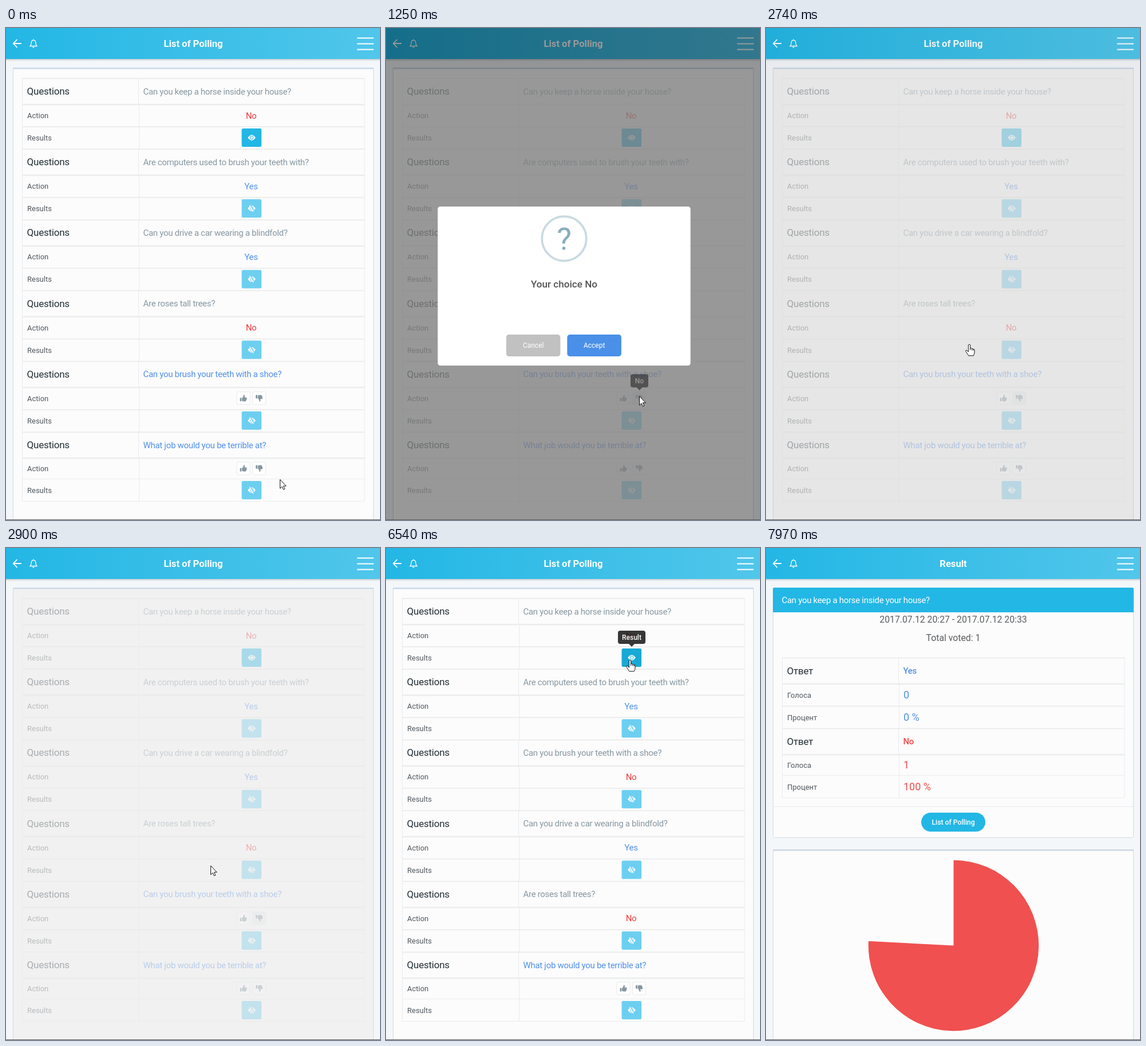
An HTML page for the animation above (8 s loop, 653 px wide and 857 px high).

```html
<!DOCTYPE html>
<html lang="en">
<head>
<meta charset="utf-8">
<title>List of Polling</title>
<style>
html, body { margin: 0; width: 100%; height: 100%; overflow: hidden; background: #f4f7fa; }
svg { display: block; width: 653px; height: 857px; }
text { font-family: Roboto, "Open Sans", sans-serif; font-weight: 400; }
.label { font-size: 17px; letter-spacing: -.22px; fill: #232f36; }
.body { font-size: 15px; letter-spacing: -.3px; }
.small { font-size: 13px; fill: #51585e; }
.value { font-size: 18px; }
.title { font-size: 16.6px; font-weight: 700; fill: #fff; }
.info { font-size: 15.8px; fill: #5a5d60; }
.tip { font-size: 12px; fill: #fff; }
.mid { text-anchor: middle; }
.strong { font-weight: 500; }
</style>
</head>
<body>
<svg id="stage" viewBox="0 0 653 857" xmlns="http://www.w3.org/2000/svg"></svg>
<script>
const W = 653, H = 857, LOOP = 8000;
const CYAN = '#23b7e5', PALE = '#6dcff0', BLUE = '#5290ea', RED = '#ee3b3b', GREY = '#8797a1';

// ---- markup helpers ----
const rect = (x, y, w, h, fill, extra = '') =>
  `<rect x="${x}" y="${y}" width="${w}" height="${h}" fill="${fill}" ${extra}/>`;
const text = (x, y, str, cls, extra = '') =>
  `<text x="${x}" y="${y}" class="${cls}" ${extra}>${str}</text>`;
const group = (id, body, extra = '') => `<g id="${id}" ${extra}>${body}</g>`;
const fill = c => `fill="${c}"`;

function eye(y, open) {
  const c = open ? CYAN : PALE;
  const slash = open ? '' :
    `<path d="M-2.6-6L4.4 5.4" stroke="${c}" stroke-width="1.6"/><path d="M-3.8-5.6L3.2 5.8" stroke="#fff" stroke-width="1.3"/>`;
  return rect(411.5, y - 16, 34.5, 32, c, 'rx="2.5"' + (open ? ' class="open"' : '')) +
    `<g transform="translate(429 ${y})" fill="none"><path d="M-6.8 0Q0-9.4 6.8 0Q0 9.4-6.8 0Z" fill="#fff"/>
     <circle r="2.9" stroke="${c}" stroke-width="1"/>${slash}</g>`;
}

function thumb(x, y, flip, id) {
  return rect(x - 11.5, y - 11, 23, 22, '#fff', `id="${id}" rx="2" stroke="#e6eaed"`) +
    `<path transform="translate(${x} ${y}) scale(1 ${flip})" fill="${GREY}"
      d="M-6-.5h2.8v6H-6ZM-2.4-.5C-.8-1.4.2-3 .4-5.8C2.4-6.2 3-4 2-1.4H5.4Q6.6-1 5.8.6Q6.2 1.6 5.4 2.4Q5.6 3.6 4.6 4.2Q4.6 5.6 3 5.6H.6L-2.4 4.8Z"/>`;
}

// Row group: a heading row and two detail rows; the last one is a little shorter.
function rows(y, last, labels, cells) {
  const [a, b, end] = last ? [64, 102, 121] : [65, 104, 123.2];
  const line = (dy, h, c = '#ececee') => rect(28, y + dy, 598.5, h, c);
  return line(0, 1.8) + line(45, 2.6, '#eceded') + line(end - 39, last ? 1 : 1.8) +
    (last ? line(end, 1) : '') +
    rect(28, y, 1, end, '#e9ebed') + rect(625.5, y, 1, end, '#e9ebed') +
    rect(231, y, 1, 45, '#e9ebed') + rect(232, y + 46, 1, end - 46, '#e9ebed') +
    text(36.5, y + 29, labels[0], 'label') +
    text(37, y + a + 5, labels[1], 'small') +
    text(37, y + b + 5, labels[2], 'small') + cells(y, y + a, y + b);
}

const card = (y, h) =>
  rect(12.5, y + .5, 629, h, '#fcfcfc', 'rx="3" stroke="#cfdbe4"') +
  rect(12, y, 630, 2.6, '#cbd8e5', 'rx="1.3"');

function poll(id, items) {
  return group(id, items.map(([q, answer], i) =>
    rows(87 + i * 123.2, i === 5, ['Questions', 'Action', 'Results'], (y, act, res) =>
      text(239.5, y + 28.5, q, 'body', fill(answer ? GREY : BLUE)) +
      (answer
        ? text(428, act + 5.5, answer, 'body mid', fill(answer === 'No' ? RED : BLUE))
        : thumb(414.5, act, 1, `${id}-up${i}`) + thumb(442, act, -1, `${id}-down${i}`)) +
      eye(res, i === 0))).join(''));
}

function tooltip(id, x, y, w, str) {
  return group(id, rect(x - w / 2, y, w, 23, '#222', 'rx="4"') +
    `<path d="M${x - 5} ${y + 23}h10l-5 5Z" fill="#222"/>` + text(x, y + 16, str, 'tip mid strong'), 'opacity="0"');
}

function answers(y, last, name, votes, pct, color) {
  return rows(y, last, ['Ответ', 'Голоса', 'Процент'], (top, a, b) =>
    text(239.5, top + 28.5, name, 'body strong', fill(color)) +
    text(240, a + 6.5, votes, 'value', fill(color)) +
    text(240, b + 6.5, pct, 'value', fill(color)));
}

// ---- scene ----
const horse = 'Can you keep a horse inside your house?';
const teeth = ['Are computers used to brush your teeth with?', 'Yes'];
const car = ['Can you drive a car wearing a blindfold?', 'Yes'];
const roses = ['Are roses tall trees?', 'No'];
const shoe = 'Can you brush your teeth with a shoe?';
const job = ['What job would you be terrible at?'];

const header = rect(0, 0, W, 54, 'url(#sky)') + rect(0, 54, W, 4, 'url(#shade)') +
  `<g fill="none" stroke="#fff" stroke-width="1.8">
   <path d="M27 27H13M19.5 20L12.8 27L19.5 34"/>
   <path d="M613 17.5H642M613 27.5H642M613 37.5H642"/>
   <path d="M42 31.5Q44.2 29 44.2 25.5Q44.2 21.3 48 21.3T51.8 25.5Q51.8 29 54 31.5Z" stroke-width="1.3"/>
   <path d="M46.5 33.2Q48 35 49.5 33.2M48 19.5V21.3" stroke-width="1.3"/></g>` +
  text(327, 33.3, 'List of Polling', 'title mid', 'id="title"');

const result = card(69, 435) + rect(12, 69, 630, 43, CYAN, 'rx="3"') + rect(12, 104, 630, 8, CYAN) +
  text(27.5, 95.5, horse, 'body', fill('#fff')) +
  text(327, 129.5, '2017.07.12 20:27 - 2017.07.12 20:33', 'info mid') +
  text(327, 161.5, 'Total voted: 1', 'info mid') +
  answers(190.5, false, 'Yes', '0', '0 %', BLUE) +
  answers(313.7, true, 'No', '1', '100 %', '#f04a4a') +
  rect(13, 450, 628, 1, '#e6eaed') + rect(271, 461, 112, 33, CYAN, 'rx="16.5"') +
  text(327, 481.5, 'List of Polling', 'mid strong', 'fill="#fff" font-size="12.2"') +
  card(525, 340) + '<path id="pie" fill="#f05050"/>';

const button = (x, color, str, id) => rect(x, 91.6, 102.4, 41, color, `rx="5" id="${id}"`) +
  text(x + 51.2, 116.8, str, 'mid', 'fill="#fff" font-size="13"');

const modal = rect(-239, -150, 478, 300, '#fff', 'rx="5"') +
  '<circle cy="-89.5" r="42" fill="none" stroke="#c9dae1" stroke-width="4"/>' +
  text(0, -69, '?', 'mid', 'font-size="59" fill="#87adbd"') +
  text(0, 2.5, 'Your choice No', 'mid strong', 'font-size="18.5" fill="#545454"') +
  button(-109.5, '#c1c1c1', 'Cancel', 'cancel') + button(5.8, '#4a90e8', 'Accept', 'accept');

const cursor = `<g fill="#fff" stroke="#111" stroke-width="1" stroke-linejoin="round">
  <path id="arrow" d="M.5.5V16L4 12.8L6.4 18L8.8 17L6.4 11.8H11.2Z"/>
  <path id="hand" d="M-1.7 1Q0-1 1.7 1V7Q3.6 5.8 4.6 7.6Q6.4 6.8 7 8.5Q9 8 9 10V14Q9 17 7.2 19.8H-1.4Q-3 16.5-6.2 12.4Q-6.8 10.2-4.8 10.2L-1.7 13ZM1.7 7V10M4.6 7.6V10.5M7 8.5V11"/></g>`;

document.getElementById('stage').innerHTML = `<defs>
  <linearGradient id="sky"><stop stop-color="${CYAN}"/><stop offset="1" stop-color="#51c6ea"/></linearGradient>
  <linearGradient id="shade" x2="0" y2="1"><stop stop-color="#c9ced2"/><stop offset="1" stop-color="#f4f7fa"/></linearGradient></defs>` +
  rect(0, 0, W, H, '#f4f7fa') + header +
  group('list', card(69, 800) +
    poll('before', [[horse, 'No'], teeth, car, roses, [shoe], job]) +
    poll('after', [[horse, 'No'], teeth, [shoe, 'No'], car, roses, job]) +
    rect(13, 71.5, 628, 790, '#fff', 'id="veil"')) +
  group('result', result) + rect(0, 53.6, W, 2.4, '#2b7de0', 'id="bar"') +
  tooltip('tipYes', 414.5, 603, 34, 'Yes') + tooltip('tipNo', 442.5, 603, 31, 'No') +
  tooltip('tipResult', 429, 144, 48, 'Result') +
  rect(0, 0, W, H, '#000', 'id="dim"') + group('modal', modal) +
  group('cursor', cursor) + rect(0, 856, W, 1, '#5c5f61');

// ---- motion ----
const $ = id => document.getElementById(id);
const set = (id, key, value) => $(id).setAttribute(key, value);
const show = (id, on) => set(id, 'visibility', on ? 'inherit' : 'hidden');
const within = (t, a, b) => t >= a && t < b;
const ramp = (t, a, b) => Math.min(1, Math.max(0, (t - a) / (b - a)));
const pulse = (t, a, b, c, d) => ramp(t, a, b) * (1 - ramp(t, c, d));

// CSS "ease": cubic-bezier(.25, .1, .25, 1)
function ease(x) {
  let lo = 0, hi = 1;
  for (let i = 0; i < 20; i++) {
    const s = (lo + hi) / 2, r = 1 - s;
    if (.75 * r * s + s * s * s < x) lo = s; else hi = s;
  }
  const r = 1 - lo;
  return .3 * r * r * lo + 3 * r * lo * lo + lo ** 3;
}

function track(points, t, curve = p => p) {
  let i = 1;
  while (i < points.length - 1 && t >= points[i][0]) i++;
  const a = points[i - 1], b = points[i], p = curve(ramp(t, a[0], b[0]));
  return a.slice(1).map((v, k) => v + (b[k + 1] - v) * p);
}

function bounce(p) {
  const n = 7.5625;
  for (const [end, mid, base] of [[1, 0, 0], [2, 1.5, .75], [2.5, 2.25, .9375], [2.75, 2.625, .984375]])
    if (p < end / 2.75) return n * (p - mid / 2.75) ** 2 + base;
  return 1;
}

function slice(turn) {
  const a = turn * 2 * Math.PI, x = 327.5, y = 692.5, r = 148.7;
  return `M${x} ${y}V${y - r}A${r} ${r} 0 ${turn > .5 ? 1 : 0} 1 ${x + r * Math.sin(a)} ${y - r * Math.cos(a)}Z`;
}

const path = [
  [0, 478, 786], [50, 478, 786], [250, 450, 715], [440, 417, 650], [600, 417, 645], [850, 442, 641],
  [1640, 442, 641], [1900, 400, 600], [2190, 355, 551], [2840, 355, 551], [2880, 357, 553],
  [5840, 357, 553], [5870, 349, 563], [6030, 349, 563], [6250, 462, 392], [6390, 495, 205],
  [6480, 426, 195], [8000, 426, 195]
];
const OPEN = 1201, CLOSE = 2589;
const pop = [[OPEN, .7], [OPEN + 135, 1.05], [OPEN + 240, .95], [OPEN + 300, 1], [CLOSE, 1]];

function draw(t) {
  const done = t >= 7000, swapped = t >= 5150;
  show('list', !done);
  show('result', done);
  $('title').textContent = done ? 'Result' : 'List of Polling';
  show('before', !swapped);
  show('after', swapped && !done);

  // The rows fade first, then the card behind them turns grey.
  const tone = 253 - 17 * ramp(t, 1250, 1500);
  set('veil', 'fill', `rgb(${tone},${tone},${tone})`);
  set('veil', 'opacity', t < 5050 ? .67 * ramp(t, 1180, 1250) : 0);
  set('dim', 'opacity', .4 * pulse(t, 1180, 1250, 2600, 2760));

  const scale = t < CLOSE ? track(pop, t, ease)[0] : 1 - .5 * ease(ramp(t, CLOSE, CLOSE + 200));
  show('modal', within(t, 1200, 2740));
  set('modal', 'transform', `translate(311 449.5) scale(${scale})`);
  set('modal', 'opacity', pulse(t, 1190, 1230, 2600, 2740));
  set('accept', 'fill', t >= 2470 ? '#3f7cc9' : '#4a90e8');

  set('before-up4', 'fill', within(t, 420, 690) ? '#edf1f2' : '#fff');
  set('before-down4', 'fill', t >= 780 ? '#edf1f2' : '#fff');
  document.querySelector('#after .open').setAttribute('fill', t >= 6460 ? '#19a9d5' : CYAN);

  set('tipYes', 'opacity', .9 * pulse(t, 440, 560, 680, 780));
  set('tipNo', 'opacity', .9 * pulse(t, 850, 970, 1195, 1330));
  set('tipResult', 'opacity', done ? 0 : .9 * ramp(t, 6440, 6540));

  set('bar', 'width', 403 + 250 * ramp(t, 5050, 5220));
  set('bar', 'opacity', t < 5050 ? 0 : 1 - ramp(t, 5220, 5420));

  const [x, y] = track(path, t);
  const hand = within(t, 430, 680) || within(t, 780, 1200) || within(t, 2130, 2860) || t >= 6460;
  set('cursor', 'transform', `translate(${x} ${y})`);
  show('cursor', !done);
  show('arrow', !hand);
  show('hand', hand);

  set('pie', 'd', slice(Math.min(.9999, bounce(ramp(t, 6967, 8927)))));
}

const start = performance.now();
function tick() {
  draw((performance.now() - start) % LOOP);
  requestAnimationFrame(tick);
}
tick();
</script>
</body>
</html>
```
